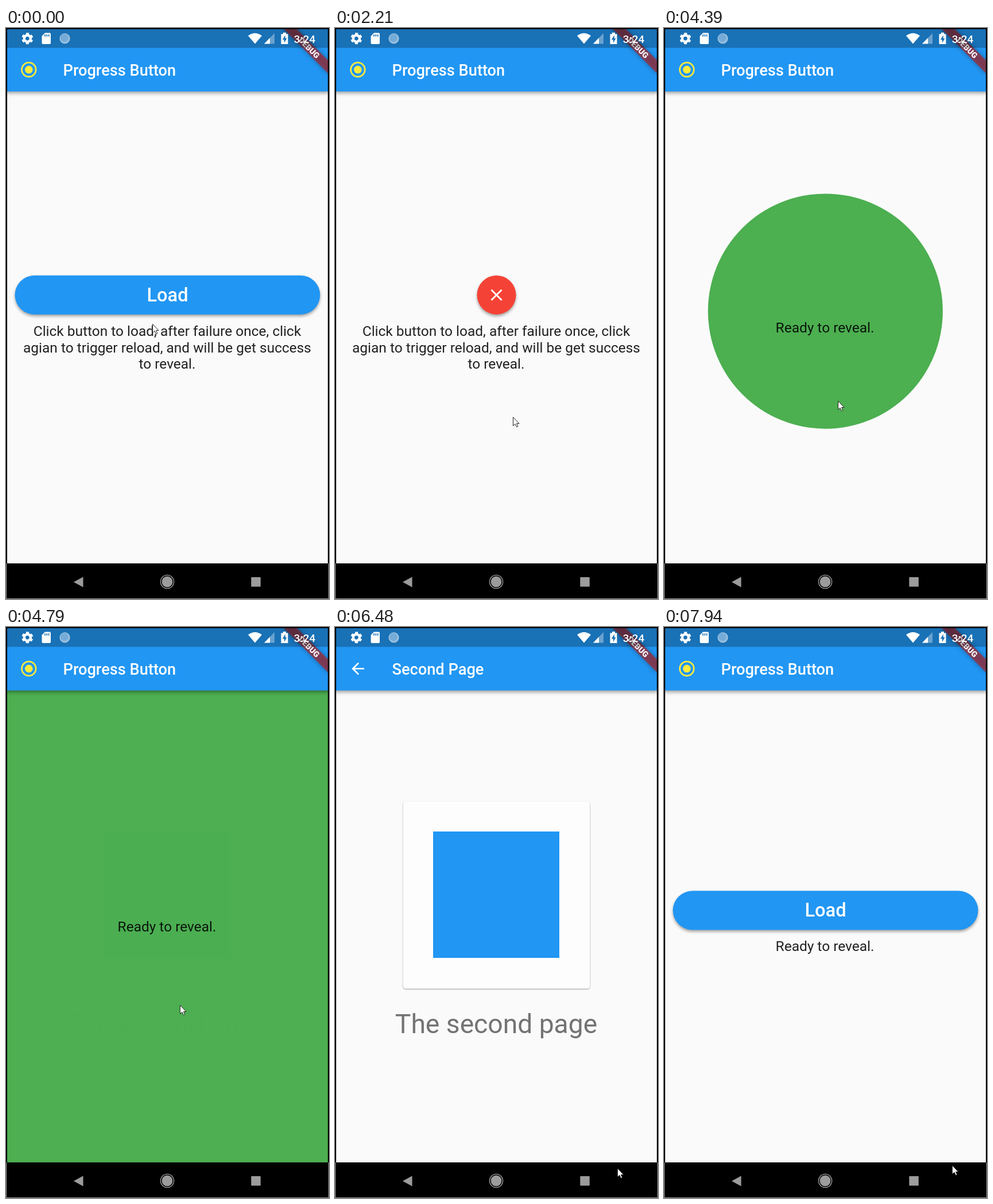
These frames come from a looping animation (563 by 994 pixels, 8 s). An HTML page:

```html
<!DOCTYPE html>
<html lang="en">
<head>
<meta charset="utf-8">
<title>Progress Button</title>
<style>
html, body { margin: 0; width: 100%; height: 100%; overflow: hidden; background: #000; }
svg { display: block; width: 563px; height: 994px; font-family: Roboto, sans-serif; }
.bar { fill: #2196f3; filter: drop-shadow(0 3px 3px rgba(0,0,0,.36)); }
.title { font-size: 27.2px; font-weight: 500; fill: #fff; }
.body { font-size: 24.46px; fill: #000; fill-opacity: .87; text-anchor: middle; }
.mid { text-anchor: middle; }
#button { filter: drop-shadow(0 3px 2.5px rgba(0,0,0,.36)); }
#card { filter: drop-shadow(0 1.4px 1px rgba(0,0,0,.38)); }
#ribbon { filter: drop-shadow(0 0 4px rgba(0,0,0,.5)); }
</style>
</head>
<body>
<svg viewBox="0 0 563 994">
  <defs>
    <clipPath id="screen"><rect x="2" y="2" width="559" height="930"/></clipPath>
    <clipPath id="ink"><rect class="pill" height="68" y="-34" rx="34"/></clipPath>
  </defs>
  <rect width="563" height="994"/>
  <g clip-path="url(#screen)">
    <g id="first">
      <rect width="563" height="994" fill="#fafafa"/>
      <circle id="reveal" cx="281.3" cy="493" fill="#4caf50"/>
      <g id="control">
        <rect id="button" class="pill" height="68" y="-34" rx="34"/>
        <g clip-path="url(#ink)"><circle id="splash" cx="14" cy="10" fill="#c8c8c8"/></g>
        <text id="load" class="mid" y="11" font-size="32.6" font-weight="500" fill="#fff">Load</text>
        <path id="spinner" fill="none" stroke="#fff" stroke-width="5.4"/>
        <path id="cross" d="M-9-9L9 9M9-9L-9 9" stroke="#fff" stroke-width="2.8"/>
        <path id="check" d="M-11.5 .5L-4.4 7.6L11.2-8" fill="none" stroke="#fff" stroke-width="2.8"/>
      </g>
      <g id="hint" class="body">
        <text x="281" y="536">Click button to load, after failure once, click</text>
        <text x="281" y="564.6">agian to trigger reload, and will be get success</text>
        <text x="281" y="593.2">to reveal.</text>
      </g>
      <text id="ready" class="body" x="280.5">Ready to reveal.</text>
      <rect class="bar" width="563" height="110.5"/>
      <circle cx="39.8" cy="72.5" r="12.3" fill="none" stroke="#ffeb3b" stroke-width="2.7"/>
      <circle cx="39.8" cy="72.5" r="6.8" fill="#ffeb3b"/>
      <text class="title" x="99.5" y="82.5">Progress Button</text>
    </g>
    <g id="second">
      <rect width="563" height="994" fill="#fafafa"/>
      <rect id="card" x="118.7" y="304" width="325.6" height="325.6" rx="5" fill="#fdfdfd"/>
      <rect x="171" y="356" width="220" height="220" fill="#2196f3"/>
      <text class="mid" x="281" y="707" font-size="46.2" fill-opacity=".54">The second page</text>
      <rect class="bar" width="563" height="110.5"/>
      <circle id="tap" cx="40" cy="72.5" fill="#c8c8c8"/>
      <path transform="translate(23.7 56.2) scale(1.359)" fill="#fff"
        d="M20 11H7.83l5.59-5.59L12 4l-8 8 8 8 1.41-1.41L7.83 13H20z"/>
      <text class="title" x="99.5" y="82.5">Second Page</text>
    </g>
    <g transform="translate(561 2) rotate(45)">
      <rect id="ribbon" x="-54.4" y="38" width="108.8" height="16.3" fill="#b71c1c" fill-opacity=".63"/>
      <text class="mid" y="51" font-size="13.9" font-weight="900" fill="#fff">DEBUG</text>
    </g>
    <rect width="563" height="34.5" fill-opacity=".25"/>
  </g>
  <g fill="#fff">
    <g fill="none" stroke="#fff" transform="translate(37.3 18.3) rotate(30)">
      <circle r="5.6" stroke-width="4.4"/>
      <circle r="8.3" stroke-width="3.4" stroke-dasharray="4.9 3.79" stroke-dashoffset="2.45"/>
    </g>
    <path d="M68 8.5H76a2 2 0 0 1 2 2V26a2 2 0 0 1-2 2H64.5a2 2 0 0 1-2-2V14z"/>
    <path d="M68 11v4M71.3 11v4M74.6 11v4" stroke="#1971b6" stroke-width="1.6"/>
    <circle cx="102.5" cy="18.3" r="8.6" fill-opacity=".5" stroke="#fff" stroke-opacity=".55"/>
    <circle cx="101.5" cy="17" r="6.8" fill="#6fa8d6" fill-opacity=".8"/>
    <path d="M434 27.5L422 13.5Q434 4.5 446 13.5z"/>
    <path d="M450 27.5H468V9z" fill-opacity=".35"/>
    <path d="M450 27.5H460V17.3z"/>
    <path d="M483 8h5v2.5h3.5v17.5h-12V10.5H483z"/>
    <path d="M486.8 12.5L481.8 20.5h3.2v5.5l4.5-8h-2.7z" fill="#1971b6"/>
    <text x="501.8" y="25.5" font-size="19" font-weight="500">3:24</text>
  </g>
  <g fill="#9c9c9c">
    <path d="M118 964.5L134.5 955.5V973.5z"/>
    <circle cx="281" cy="964" r="9.4"/>
    <circle cx="281" cy="964" r="11.6" fill="none" stroke="#9c9c9c" stroke-width="1.4"/>
    <rect x="427.3" y="956" width="16.5" height="16.5" rx="1"/>
    <path d="M.5 932V993.5H562.5V932" fill="none" stroke="#9c9c9c"/>
  </g>
  <path id="cursor" d="M.5 .5V15.5L4 12.3L6.5 17.5L8.8 16.5L6.5 11.5H11z" fill="#fff" stroke="#222" stroke-width="1"/>
</svg>
<script>
const LOOP = 8000;
const BLUE = [33, 150, 243], RED = [244, 67, 54], GREEN = [76, 175, 80], PRESSED = [188, 188, 188];

// pointer stops: time, x, y
const STOPS = [
  [40, 255, 515], [220, 294, 473], [860, 294, 473], [1140, 255, 712],
  [1260, 255, 712], [2060, 310, 677], [2210, 310, 677], [2690, 259, 482],
  [2880, 259, 482], [3160, 304, 607], [3340, 303, 649], [4600, 303, 649],
  [4790, 303, 658], [4940, 303, 660], [5110, 303, 660], [5220, 291, 601],
  [5400, 291, 601], [5560, 240, 540], [5960, 496, 976], [6060, 504, 962],
  [6170, 492, 942], [6480, 492, 942], [7120, 56, 83], [7560, 56, 83], [7940, 502, 937]
];

const $ = id => document.getElementById(id);
const set = (el, attrs) => { for (const k in attrs) el.setAttribute(k, attrs[k]); };
const show = (id, on) => set($(id), { visibility: on ? "visible" : "hidden" });
const ramp = (t, a, b) => Math.min(1, Math.max(0, (t - a) / (b - a)));
const smooth = x => x * x * (3 - 2 * x);
const lerp = (a, b, k) => a + (b - a) * k;
const mix = (a, b, k) => a.map((v, i) => lerp(v, b[i], k));

// cubic-bezier(.4, 0, .2, 1)
function fastOutSlowIn(x) {
  let lo = 0, hi = 1;
  for (let i = 0; i < 20; i++) {
    const s = (lo + hi) / 2, r = 1 - s;
    if (1.2 * r * r * s + 0.6 * r * s * s + s ** 3 < x) lo = s; else hi = s;
  }
  return 3 * (1 - lo) * lo * lo + lo ** 3;
}

function spinnerPath(ms) {
  const turns = ms / 1333, p = turns % 1, step = Math.floor(turns) % 5;
  const head = fastOutSlowIn(ramp(p, 0, .5)), tail = fastOutSlowIn(ramp(p, .5, 1));
  const start = Math.PI * (-.5 + 1.5 * tail + 1.7 * p - .8 * step);
  const sweep = Math.max(1.5 * Math.PI * (head - tail), .001);
  const at = a => `${24.5 * Math.cos(a)} ${24.5 * Math.sin(a)}`;
  return `M${at(start)}A24.5 24.5 0 ${sweep > Math.PI ? 1 : 0} 1 ${at(start + sweep)}`;
}

function pointer(t) {
  const i = STOPS.findIndex(s => s[0] > t);
  if (i === 0) return STOPS[0].slice(1);
  if (i < 0) return STOPS[STOPS.length - 1].slice(1);
  const [a, b] = [STOPS[i - 1], STOPS[i]], k = smooth(ramp(t, a[0], b[0]));
  return [lerp(a[1], b[1], k), lerp(a[2], b[2], k)];
}

function buttonColor(t) {
  if (t >= 4300) return BLUE;
  if (t >= 3870) return mix(BLUE, GREEN, ramp(t, 3870, 4020));
  if (t >= 2870) return mix(RED, BLUE, ramp(t, 2870, 3050));
  return mix(BLUE, RED, ramp(t, 1880, 2060));
}

function draw(t) {
  const done = t >= 4300, back = t >= 7000;
  const pressed = done ? 0 : ramp(t, 400, 600) * (1 - ramp(t, 880, 1080));
  const width = done ? 532 : lerp(532, 68, ramp(t, 880, 1180));
  const loading = t >= 880 && t < 1880 || t >= 2870 && t < 3870;

  document.querySelectorAll(".pill").forEach(el => set(el, { x: -width / 2, width }));
  set($("button"), { fill: `rgb(${mix(buttonColor(t), PRESSED, .4 * pressed)})` });
  set($("splash"), { r: 300 * ramp(t, 400, 1080), opacity: .4 * pressed });
  set($("control"), {
    transform: `translate(281.5 ${back ? 493.3 : 464.7})`,
    opacity: done && !back ? 0 : 1
  });
  set($("spinner"), { d: spinnerPath(t < 2870 ? Math.max(0, t - 880) : t - 2870) });
  show("load", t < 880 || back);
  show("spinner", loading);
  show("cross", t >= 1880 && t < 2870);
  show("check", t >= 3870 && !done);

  show("reveal", done && !back);
  set($("reveal"), { r: 34 + 900 * ramp(t, 4300, 4780) });
  show("hint", !done);
  show("ready", done);
  set($("ready"), { y: back ? 564 : 530 });

  const fade = ramp(t, 4790, 4985) * (1 - ramp(t, 7370, 7600));
  set($("second"), { opacity: fade });
  set($("tap"), { r: 47 * ramp(t, 7290, 7480), opacity: .4 * ramp(t, 7290, 7350) });

  set($("cursor"), { transform: `translate(${pointer(t)})` });
}

function frame() {
  draw(performance.now() % LOOP);
  requestAnimationFrame(frame);
}
frame();
</script>
</body>
</html>
```
